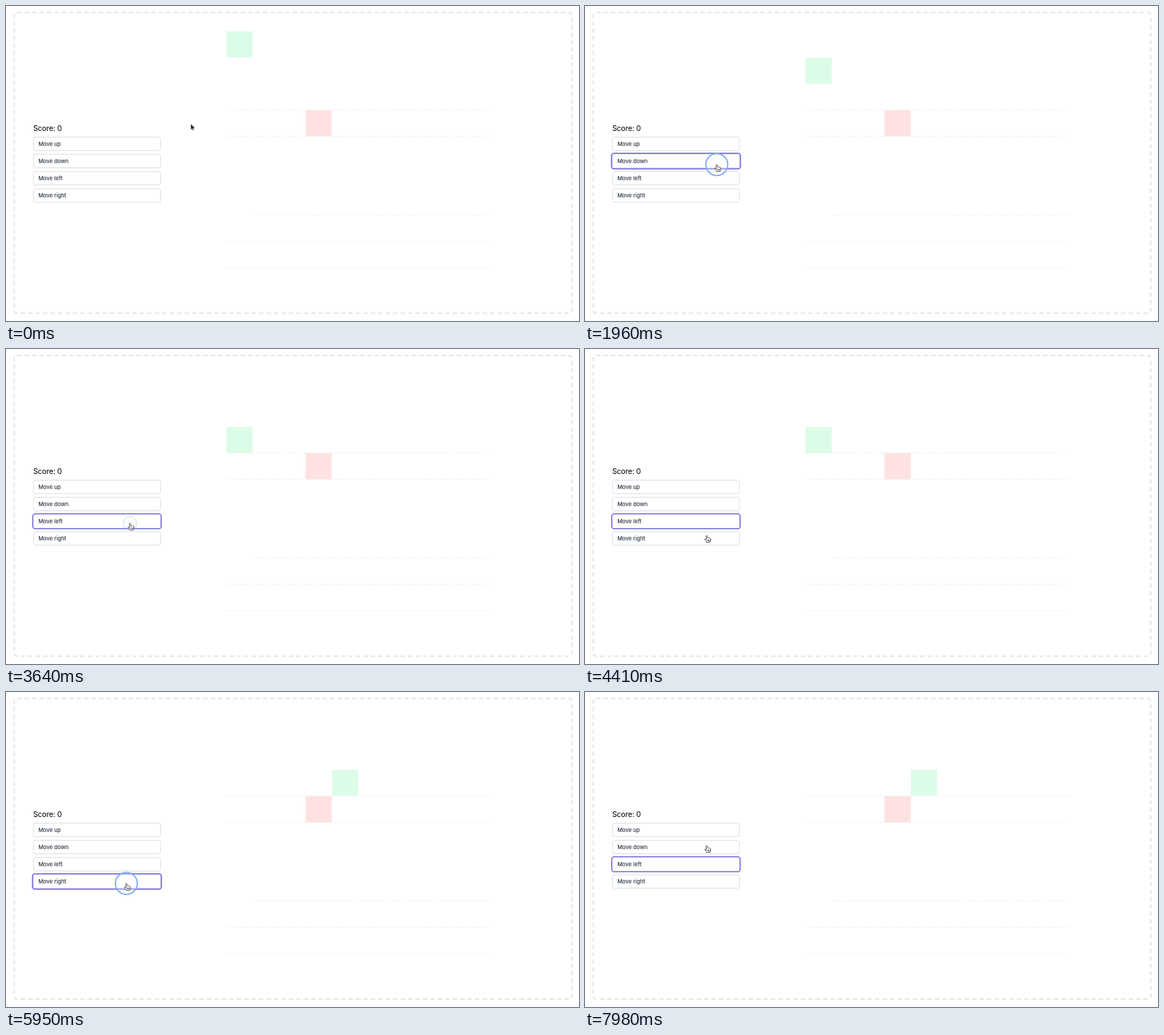
An HTML page for the animation above (8000 ms loop, 800 px wide and 441 px high).

```html
<!DOCTYPE html>
<html lang="en">
<head>
<meta charset="utf-8">
<title>Grid game</title>
<style>
  html, body { margin: 0; width: 100%; height: 100%; overflow: hidden; background: #fff; }
  svg { display: block; width: 800px; height: 441px; }
  text { font-family: Inter, Roboto, sans-serif; }
  .score { font-size: 10.5px; letter-spacing: -.2px; fill: #000; }
  .label { font-size: 7.6px; font-weight: 500; fill: #2a3340; }
  .button { fill: #fff; stroke: #d9dbe0; stroke-width: .9; }
</style>
</head>
<body>
<svg viewBox="0 0 800 441">
  <rect x="11.5" y="9" width="778.5" height="421" rx="4" fill="none" stroke="#e5e6e9" stroke-width="2" stroke-dasharray="6 4.4"/>
  <g id="lines" stroke="#efefef" stroke-width=".8" stroke-dasharray="3 1.5"></g>
  <rect id="goal" fill="#fee2e2"/>
  <rect id="player" fill="#dcfce7"/>
  <text class="score" x="38" y="175">Score: 0</text>
  <g id="buttons"></g>
  <rect id="focus" fill="none" stroke="#6a62dc"/>
  <circle id="ripple" fill="#fff" fill-opacity=".25" stroke="#7aaaf0" stroke-width="1.7"/>
  <g id="cursor">
    <path id="arrow" d="M0 0V8.4L1.9 6.7L3.2 9.6L4.6 9L3.3 6.2L5.8 6Z" fill="#111" stroke="#fff" stroke-width=".5"/>
    <path id="hand" d="M-1 1.1Q-1 .2-.2 .2Q.6 .2.7 1L1.3 3.4Q2.2 2.7 2.8 3.6Q3.7 3 4.2 4Q5.2 3.6 5.4 4.7L5.5 6.6L4.8 8.2V9.6H-.2V8.8L-2.8 5.8Q-2.9 4.7-1.8 4.9L-.3 6ZM1.4 6V8M2.7 6V8M4 6V8" fill="#fff" stroke="#333" stroke-width=".8" stroke-linejoin="round"/>
  </g>
</svg>
<script>
const LOOP = 8000, STEP = 70, CELL = 36.8, LEFT = 307.8, TOP = 35.5;
const BUTTON = { x: 38.4, y: 183.6, w: 177.2, h: 18.8, pitch: 24.1 };
const DOWN = 1, WEST = 2, EAST = 3;
const MOVES = [[0, -1], [0, 1], [-1, 0], [1, 0]];

// time, x, y of the pointer tip
const PATH = [
  [210, 258, 165], [980, 187, 216], [1260, 187, 216], [1540, 184, 222],
  [2870, 184, 222], [2940, 181, 232], [3360, 174, 244], [4060, 172, 244],
  [4410, 170, 261], [4620, 168, 268], [6230, 168, 268], [6650, 170, 244],
  [7280, 170, 244], [7980, 170, 215]
];

// press time, button
const CLICKS = [
  [1750, DOWN], [2310, DOWN], [3640, WEST], [4690, EAST], [5110, EAST],
  [5460, EAST], [5740, EAST], [6020, EAST], [6790, WEST]
];

const $ = id => document.getElementById(id);
const set = (el, attrs) => { for (const k in attrs) el.setAttribute(k, attrs[k]); return el; };
const add = (parent, tag, attrs) =>
  parent.appendChild(set(document.createElementNS("http://www.w3.org/2000/svg", tag), attrs));
const buttonTop = i => BUTTON.y + i * BUTTON.pitch;
const place = (el, col, row) =>
  set(el, { x: LEFT + col * CELL, y: TOP + row * CELL, width: CELL - .2, height: CELL - .2 });

["up", "down", "left", "right"].forEach((name, i) => {
  const y = buttonTop(i);
  add($("buttons"), "rect", { class: "button", x: BUTTON.x, y, width: BUTTON.w, height: BUTTON.h, rx: 2.6 });
  add($("buttons"), "text", { class: "label", x: 45.2, y: y + 12.3 }).textContent = "Move " + name;
});
for (const row of [3, 4, 7, 8, 9]) {
  const y = Math.floor(TOP + row * CELL - .3) + .5;
  add($("lines"), "line", { x1: row === 7 ? 345 : 308, x2: 677, y1: y, y2: y });
}
place($("goal"), 3, 3);

function pointer(t) {
  if (t <= PATH[0][0]) return PATH[0].slice(1);
  const i = PATH.findIndex(p => p[0] >= t);
  if (i < 0) return PATH[PATH.length - 1].slice(1);
  const [t0, x0, y0] = PATH[i - 1], [t1, x1, y1] = PATH[i];
  const k = (t - t0) / (t1 - t0);
  return [x0 + (x1 - x0) * k, y0 + (y1 - y0) * k];
}

function overButton(x, y) {
  return x > BUTTON.x && x < BUTTON.x + BUTTON.w && MOVES.some((_, i) => {
    const top = buttonTop(i);
    return y > top + .6 && y < top + BUTTON.h;
  });
}

function draw(time) {
  const t = Math.floor((time % LOOP) / STEP) * STEP;
  const [x, y] = pointer(t);
  const isHand = overButton(x, y);
  set($("cursor"), { transform: `translate(${x} ${y})` });
  set($("hand"), { opacity: isHand ? 1 : 0 });
  set($("arrow"), { opacity: isHand ? 0 : 1 });

  let col = 0, row = 0, last = null;
  for (const click of CLICKS) {
    if (t < click[0]) break;
    last = click;
    if (t >= click[0] + 140) {
      const [dx, dy] = MOVES[click[1]];
      col = Math.max(0, col + dx);
      row = Math.max(0, row + dy);
    }
  }
  place($("player"), col, row);

  const age = last ? t - last[0] : Infinity;
  const pressed = age >= 70 && age < 350;
  const pad = pressed ? 1.4 : 1.1;
  set($("focus"), {
    opacity: last ? 1 : 0,
    x: BUTTON.x - pad, y: buttonTop(last ? last[1] : 0) - pad,
    width: BUTTON.w + 2 * pad, height: BUTTON.h + 2 * pad,
    rx: 3.5, "stroke-width": pressed ? 1.5 : 1.3
  });

  const grow = Math.min(1, age / 210);
  const alpha = age < 210 ? .25 + .75 * Math.min(1, age / 140) : Math.max(0, 1 - (age - 210) / 210);
  set($("ripple"), {
    cx: x, cy: y, r: 9.5 + 5.8 * grow * (1.4 - .4 * grow), opacity: alpha
  });
}

const start = performance.now();
function tick() {
  draw(performance.now() - start);
  requestAnimationFrame(tick);
}
tick();
</script>
</body>
</html>
```
